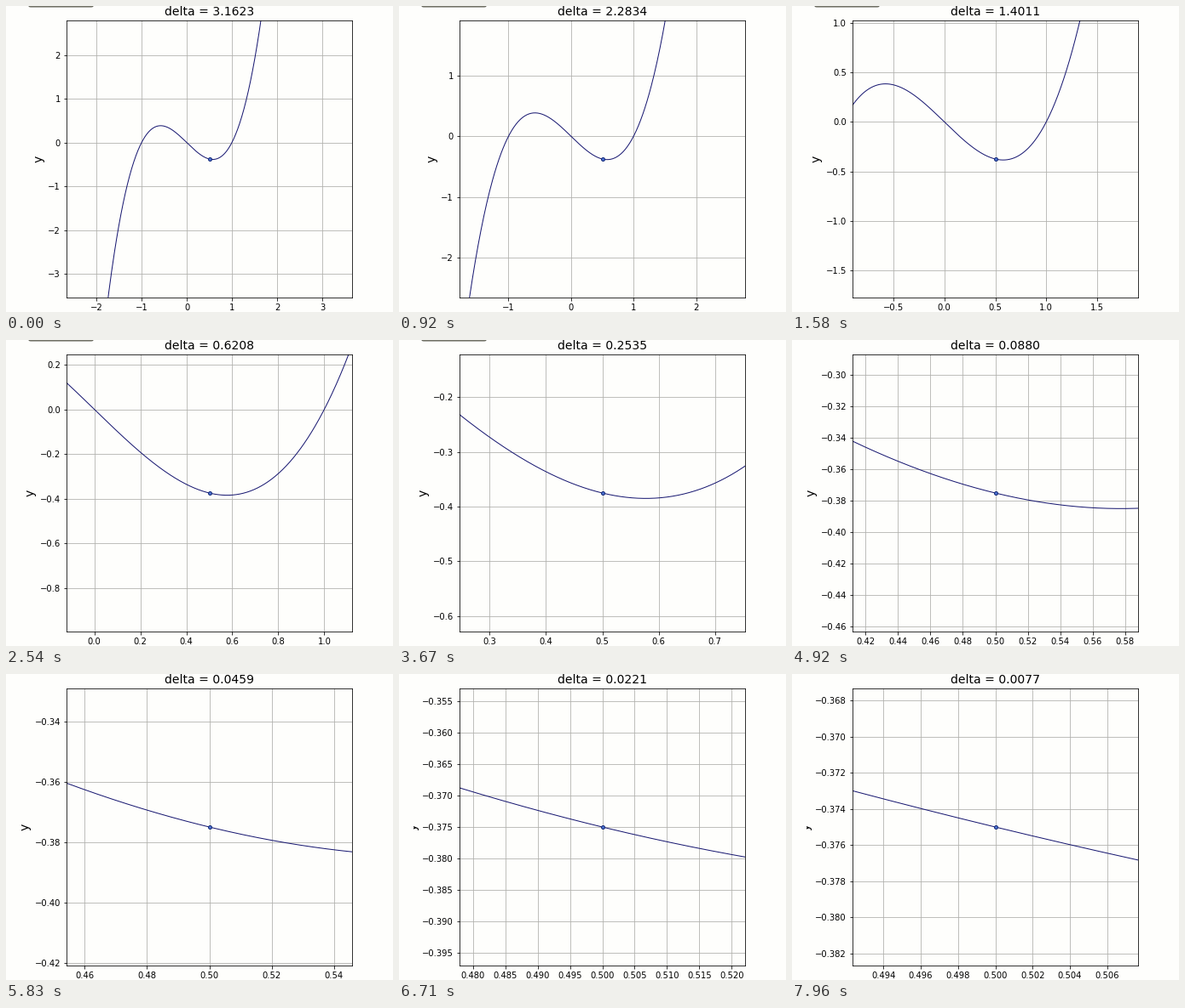
These frames come from a looping animation (454x360 px, 8000 ms). A matplotlib script:

```python
import numpy as np
import matplotlib.pyplot as plt
from matplotlib.animation import FuncAnimation
from matplotlib.patches import FancyBboxPatch, Rectangle

W, H, DPI = 454, 360, 72
INTERVAL, FRAMES = 40, 200          # 8 s loop
START, STEP = 515, 100              # ms before zooming begins, ms per zoom step
BAR_HIDES = 4300                    # ms
PAPER, GRID, INK = "#fefefc", "#b0b0ac", "#161670"
DELTAS = np.logspace(0.5, -3, 100)
X0 = 0.5


def curve(x):
    return x**3 - x


plt.rcParams.update({"font.family": "DejaVu Sans", "font.size": 10,
                     "toolbar": "None"})
fig = plt.figure(figsize=(W / DPI, H / DPI), dpi=DPI, facecolor=PAPER)

# Plot area, placed in stage pixels
left, top, width, height = 71, 17, 335, 326
ax = fig.add_axes([left / W, 1 - (top + height) / H, width / W, height / H],
                  facecolor=PAPER)
ax.grid(True, color=GRID, lw=0.8)
ax.set_ylabel("y", fontsize=14)
title = ax.set_title("", fontsize=14)
line, = ax.plot([], [], color=INK, lw=1)
ax.plot([X0], [curve(X0)], "o", ms=4, mfc="#4a70d0", mec="#182c78", mew=1)

# Overlay in stage pixels: the left window edge and a bar peeking in on top
overlay = fig.add_axes([0, 0, 1, 1], zorder=2)
overlay.set(xlim=(0, W), ylim=(H, 0))
overlay.axis("off")
overlay.add_patch(Rectangle((0, 0), 16.5, H, color=PAPER, lw=0))
bar = overlay.add_patch(FancyBboxPatch(
    (29, -9.5), 71, 7.5, boxstyle="round,pad=3,rounding_size=3",
    fc="#8c8c80", ec="#5c5c50", lw=1))


def update(frame):
    t = frame * INTERVAL
    delta = DELTAS[max(0, (t - START) // STEP)]
    x = np.linspace(X0 - delta, X0 + delta, 400)
    line.set_data(x, curve(x))
    ax.set_xlim(X0 - delta, X0 + delta)
    ax.set_ylim(curve(X0) - delta, curve(X0) + delta)
    title.set_text(f"delta = {delta:.4f}")
    bar.set_visible(t < BAR_HIDES)
    return line, title, bar


anim = FuncAnimation(fig, update, frames=FRAMES, interval=INTERVAL,
                     init_func=lambda: update(0), repeat=True,
                     repeat_delay=0, blit=False)
plt.show()
```
